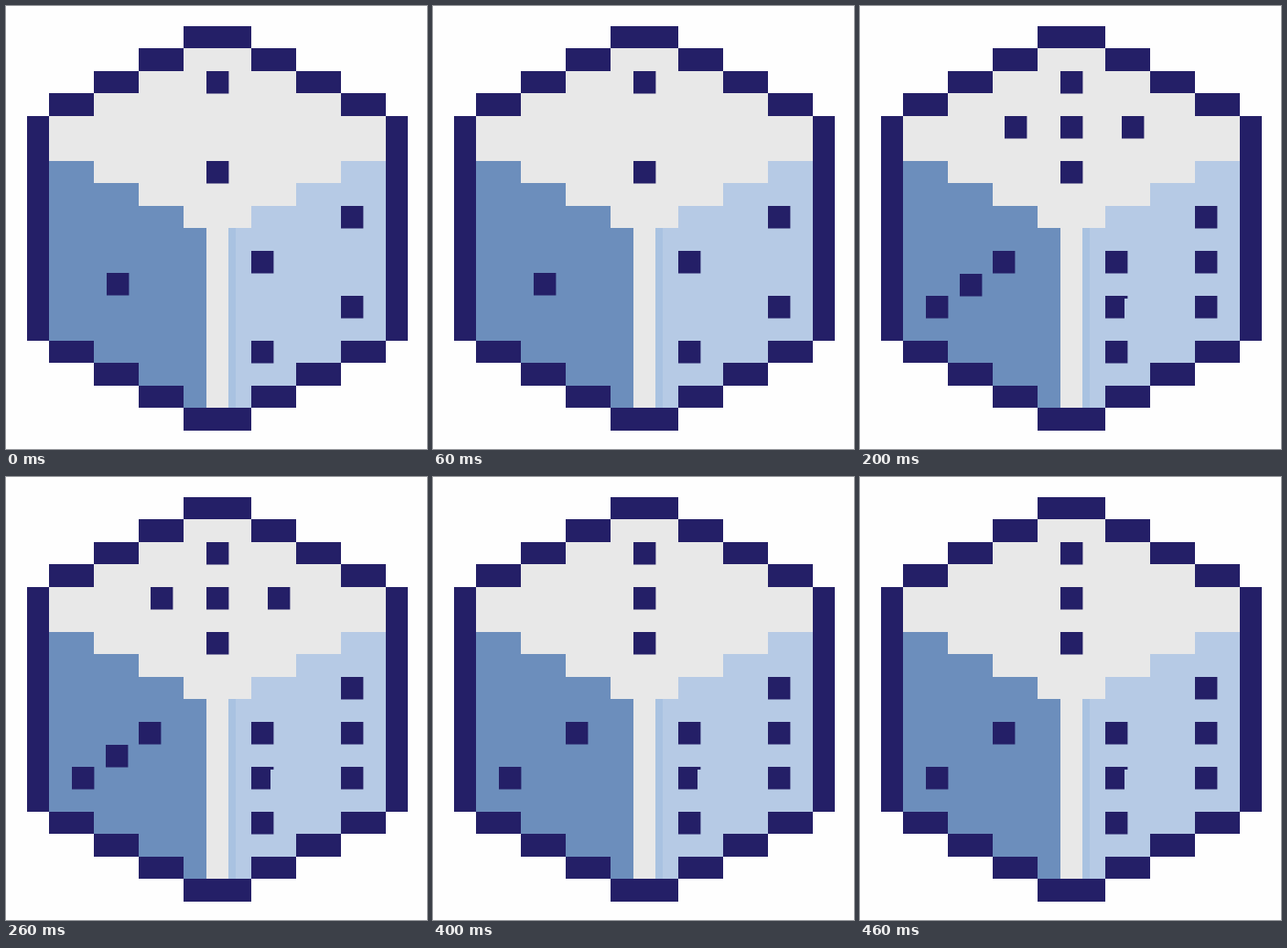
Recreate the animation shown at these times as an HTML page. Size 460x483 px, loop 0.5 s.

```html
<!DOCTYPE html>
<html lang="en">
<head>
<meta charset="utf-8">
<title>Pixel die</title>
<style>
  html, body { margin: 0; width: 100%; height: 100%; overflow: hidden; background: #fefefe; }
  svg { display: block; width: 100%; height: 100%; }
</style>
</head>
<body>
<svg viewBox="0 0 460 483">
  <path id="top" fill="#e8e8e8"/>
  <path id="left" fill="#6c8ebc"/>
  <path id="right" fill="#b6cae5"/>
  <path id="shade" fill="#a9c2e1"/>
  <path id="edge" fill="#241f67"/>
  <path id="pips" fill="#241f67"/>
</svg>
<script>
const STEP = 100;
const SIZE = 24.4;
const gx = i => Math.round(22.8 + 24.5 * i);
const gy = j => Math.round(21.7 + 24.5 * j);
const box = (x, y, w, h) => `M${x} ${y}h${w}v${h}h${-w}z`;
const cells = (i, j, w, h) => box(gx(i), gy(j), gx(i + w) - gx(i), gy(j + h) - gy(j));
const draw = (id, d) => document.getElementById(id).setAttribute('d', d);

// The die is built from stairs two cells wide, mirrored about column 8.
function buildDie() {
  let top = cells(7, 1, 3, 16), left = cells(7, 9, 1, 8), right = cells(9, 9, 1, 8);
  let edge = cells(7, 0, 3, 1) + cells(7, 17, 3, 1) + cells(0, 4, 1, 10) + cells(16, 4, 1, 10);
  for (let k = 0; k < 3; k++) {
    const a = 1 + 2 * k, b = 14 - 2 * k;
    for (const i of [a, b]) {
      edge += cells(i, 3 - k, 2, 1) + cells(i, 14 + k, 2, 1);
      top += cells(i, 4 - k, 2, 2 + 2 * k);
    }
    left += cells(a, 6 + k, 2, 8);
    right += cells(b, 6 + k, 2, 8);
  }
  draw('top', top);
  draw('left', left);
  draw('right', right);
  draw('shade', box(gx(9), gy(9), 8, gy(17) - gy(9)));
  draw('edge', edge);
}

const pips = list => list.map(([x, y]) => box(x, y, SIZE, SIZE)).join('');

const apex = [219, 71], centre = [219, 120], front = [219, 169];
const slant = [[145, 267], [72, 316]];
const four = pips([[366, 218], [268, 267], [366, 316], [268, 365]]);
// The sixth pip has a chipped right side.
const six = four + pips([[366, 267]]) + box(268, 316, 21, SIZE) + box(289, 316, 3.4, 3);

const poses = [
  pips([apex, front, [110, 291]]) + four,
  pips([apex, [131, 127], [303, 125], [221, 176], ...slant, [366, 218], [317, 293], [268, 365]]),
  pips([apex, [158, 120], centre, [286, 120], front, ...slant, [109, 292]]) + six,
  pips([centre, [115, 235], [114, 278], [114, 324]]) + six,
  pips([apex, centre, front, ...slant]) + six
];

let shown = -1;
function render(ms) {
  const n = Math.floor(ms / STEP) % poses.length;
  if (n !== shown) draw('pips', poses[shown = n]);
}

buildDie();
render(0);
const start = performance.now();
function tick() {
  render(performance.now() - start);
  requestAnimationFrame(tick);
}
requestAnimationFrame(tick);
</script>
</body>
</html>
```
